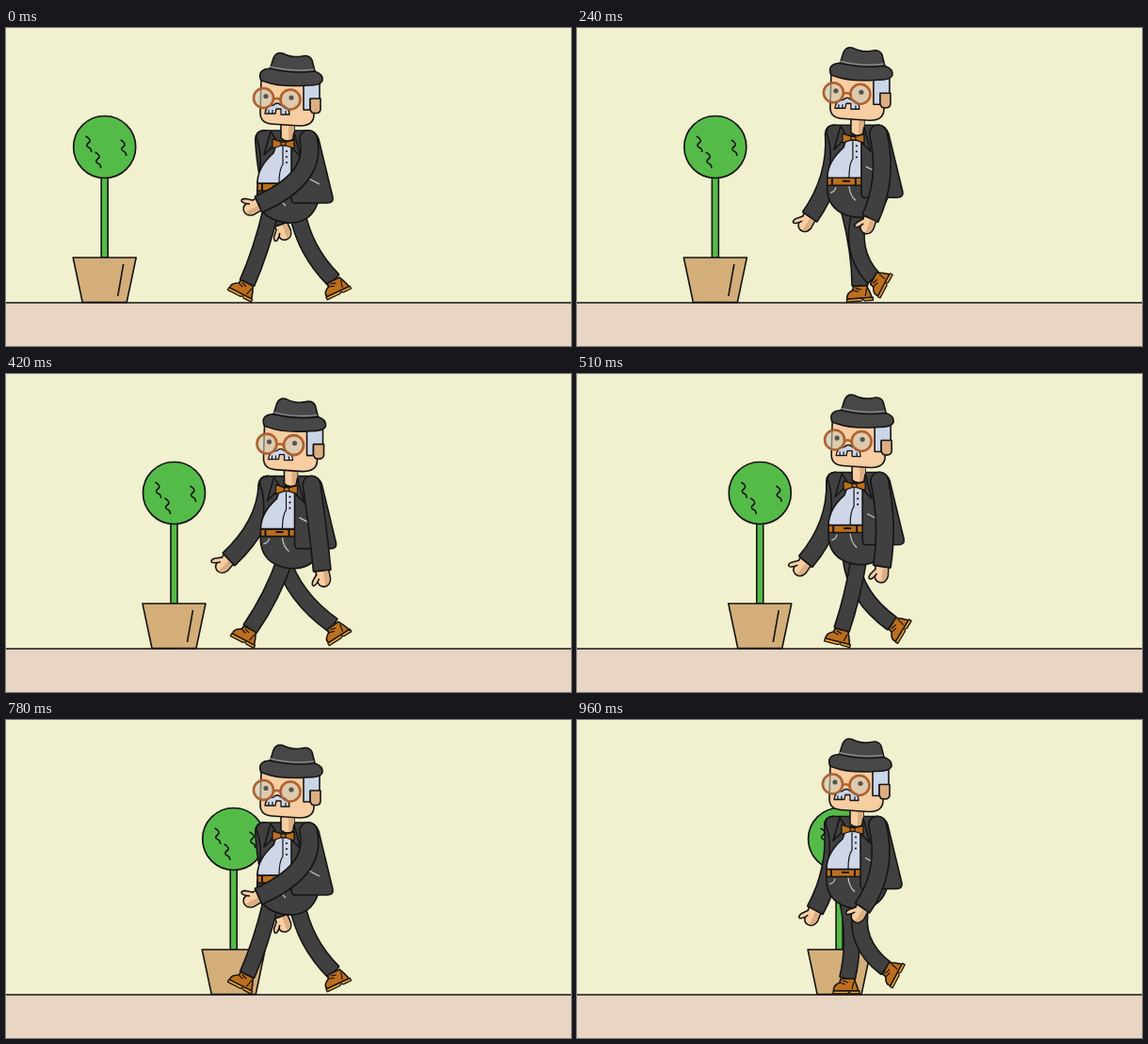
Write an HTML page with a canvas that moves like this. It is 600x338 px and loops after 990 ms.

```html
<!DOCTYPE html>
<html>
<head>
<meta charset="utf-8">
<style>
html, body { margin: 0; overflow: hidden; background: #f1f0cf; }
canvas { display: block; }
</style>
</head>
<body>
<canvas id="stage" width="600" height="338"></canvas>
<script>
const ctx = document.getElementById('stage').getContext('2d');
const INK = '#151515', SUIT = '#404040', FELT = '#474747', SKIN = '#f7cda2', SHADE = '#dbae82';
const BROWN = '#bd6f1d', HAIR = '#cbd5e8', SHIRT = '#cfd6e8', LIGHT = '#c9c9c9', RIM = '#ad6230';
const STEP = 30, LOOP = 990, CYCLE = 26;

// stride of one foot: phase, ankle x, ankle y, tilt in degrees
const stride = [
  [0, 256, 271, 27],
  [4, 281, 272, 14],
  [7, 287, 275, 0],
  [9.5, 324, 272, -10],
  [13, 348, 268, -25],
  [17.5, 333, 265, -62],
  [20, 328, 264, -62],
  [22, 298, 269, -54],
  [23, 282, 271, -10]
];

function footAt(phase) {
  const n = stride.length;
  const key = i => stride[(i + n) % n];
  const time = i => key(i)[0] + CYCLE * Math.floor(i / n);
  let i = n - 1;
  while (time(i) > phase) i--;
  const span = time(i + 1) - time(i), u = (phase - time(i)) / span;
  const slope = (j, k) => (key(j + 1)[k] - key(j - 1)[k]) / (time(j + 1) - time(j - 1)) * span;
  return [1, 2, 3].map(k => {
    const a = key(i)[k], d = key(i + 1)[k] - a, m0 = slope(i, k), m1 = slope(i + 1, k);
    return a + u * (m0 + u * (3 * d - 2 * m0 - m1 + u * (m0 + m1 - 2 * d)));
  });
}

function shape(d, fill, stroke = INK, width = 1.6) {
  const path = new Path2D(d);
  if (fill) { ctx.fillStyle = fill; ctx.fill(path); }
  if (stroke) { ctx.strokeStyle = stroke; ctx.lineWidth = width; ctx.stroke(path); }
}

function disc(x, y, r, fill, stroke, width) {
  ctx.beginPath();
  ctx.arc(x, y, r, 0, 7);
  if (fill) { ctx.fillStyle = fill; ctx.fill(); }
  if (stroke) { ctx.strokeStyle = stroke; ctx.lineWidth = width; ctx.stroke(); }
}

function placed(x, y, angle, draw) {
  ctx.save();
  ctx.translate(x, y);
  ctx.rotate(angle);
  draw();
  ctx.restore();
}

function limb(x, y, cx, cy, ex, ey, w) {
  const d = `M${x} ${y}Q${cx} ${cy} ${ex} ${ey}`;
  for (const [color, width] of [[INK, w + 3.2], [SUIT, w]]) {
    shape(d, null, color, width);
    disc(x, y, width / 2, color);
  }
  const angle = Math.atan2(ey - cy, ex - cx);
  placed(ex, ey, angle, () => shape(`M0 ${-w / 2 - 1}V${w / 2 + 1}`));
  return angle;
}

function arm(x, y, cx, cy, wx, wy) {
  const angle = limb(x, y, cx, cy, wx, wy, 17);
  placed(wx, wy, angle, () => {
    shape('M0-7L9-8Q17-7 17 0Q16 6 9 6L0 7Z', SKIN);
    shape('M1-6L9-7Q16-6 16-2L1-1Z', SHADE, null);
    shape('M3 6L10 11Q15 13 15 10Q14 7 8 4', SKIN);
  });
}

// side is 1 for the near leg and -1 for the far one
function leg(phase, side) {
  const a = phase * 2 * Math.PI / CYCLE;
  const hip = 295 - 6 * Math.cos(a) + 8 * side;
  const knee = 294 - 18 * Math.cos(a) + 5 * Math.sin(a) + 5 * side;
  const [x, y, tilt] = footAt(phase % CYCLE);
  limb(hip, 195, knee, 237, x, y, 15);
  placed(x, y, tilt * Math.PI / 180, () => {
    shape('M-7 0H7Q10 6 12 13H-14Q-16 8-8 4Z', BROWN);
    shape('M-15 13H13V16H4L2 14.5L0 16H-15Z', '#f0a22e', INK, 1.3);
    shape('M-8 4L-2 6M-5 2L1 4M7 3L5 11', null, INK, 1.2);
  });
}

function scenery(x) {
  ctx.fillStyle = '#f1f0cf';
  ctx.fillRect(0, 0, 600, 292);
  ctx.fillStyle = '#e8d5c4';
  ctx.fillRect(0, 292, 600, 46);
  shape('M0 292H600');
  placed(x, 0, 0, () => {
    shape('M-3.5 158H3.5V244H-3.5Z', '#54bb48');
    disc(0, 126.5, 33, '#54bb48', INK, 1.7);
    for (const [sx, sy] of [[-20, 115], [-10, 132], [17, 119]])
      shape(`M${sx} ${sy}q7 4 3 7q-4 3 0 5q3 1 3 5`);
    shape('M-33.5 244H33.5L23.5 291.5H-23.5Z', '#d4ae79');
    shape('M20 251L14 285');
  });
}

function torso() {
  shape('M267 170Q265 190 278 200Q290 208 304 207Q324 206 331 186V170Z', SUIT);
  shape('M276 175Q275 180 270 181M290 174Q291 184 297 189', null, LIGHT, 1.2);
  shape('M267 165H304V173H267Z', BROWN);
  shape('M272 165V173M297 165V173M283 168.5H291', null, INK, 2);
  shape('M266 117Q266 109 274 109H322Q329 110 332 118L347 180Q348 186 341 186H308Q303 187 303 181V165H267Q274 138 266 117Z', SUIT);
  shape('M288 121L284 133Q267 148 267 165H303V120H290Z', SHIRT);
  shape('M294 126V145Q290 150 290 165', null, INK, 1.2);
  for (const y of [131, 137, 143]) disc(298, y, 1.1, INK);
  shape('M292 100H306V117Q299 123 292 117Z', SKIN);
  shape('M300 102H306V117L300 119Z', SHADE, null);
  shape('M281 110L274 135L288 121ZM306 111L313 137L303 127Z', SUIT);
  shape('M283 118L292 121H297L306 119V128L297 125H292L283 128Z', BROWN, INK, 1.3);
  shape('M292 121V125M297 121V125', null, INK, 1.2);
  shape('M308 153L333 166', null, LIGHT, 1.3);
}

function head() {
  shape('M271 55L270 90Q270 101 282 102L312 104Q327 104 327 92L331 56Z', SKIN);
  shape('M316 58L333 57V76H323V87H316Z', HAIR);
  shape('M323 75H334V87Q333 92 325 90L323 87Z', SHADE);
  shape('M275 91Q276 82 284 82Q288 78 292 82Q301 83 301 92H292V86H287L286 91Z', HAIR, INK, 1.3);
  shape('M279 91V87M283 91V87M297 92V88', null, INK, 1.2);
  for (const [x, y, eye] of [[273.5, 74.5, 276], [302, 76, 303]]) {
    disc(x, y, 10.5, 'rgba(205,200,180,.6)', RIM, 2.6);
    disc(eye, y - 2, 2.6, '#555');
  }
  shape('M284 76Q288 73 292 77', null, RIM, 2.4);
  shape('M279 48L284 32Q287 25 294 27Q303 32 314 30Q322 28 325 34L329 50Z', FELT);
  shape('M270 53Q268 44 280 43Q304 49 328 46Q337 49 336 56Q334 61 320 61Q290 63 275 57Q270 56 270 53Z', FELT);
  shape('M280 41Q304 47 327 44', null, '#8a8a8a', 1.5);
}

function draw(now) {
  const t = Math.floor(now % LOOP / STEP) * STEP;
  // the last stretch runs slightly faster
  const phase = t < 780 ? t / STEP : CYCLE + (t - 780) * 7 / 180;
  const a = phase * 2 * Math.PI / CYCLE;
  const cos = Math.cos(a), sin = Math.sin(a), bob = Math.cos(2 * a);
  const bx = 2.1 * bob - 1.9 * cos - 0.2, by = 3.3 * (bob - 1);

  scenery(104.7 + phase * 5.27);
  arm(274 + bx, 118 + by, 276, 160, 260 + 28 * cos + 4 * bob, 203 + 6 * cos);
  leg(phase, -1);
  leg(phase + CYCLE / 2, 1);
  placed(bx, by, 0, torso);
  arm(321 + bx, 118 + by, 331, 160, 302 - 34 * cos - 3 * sin, 198.5 - 11 * cos);
  placed(bx, by, 0, head);
}

let start;
function loop(now) {
  start ??= now;
  draw(now - start);
  requestAnimationFrame(loop);
}
ctx.lineJoin = 'round';
requestAnimationFrame(loop);
</script>
</body>
</html>
```
